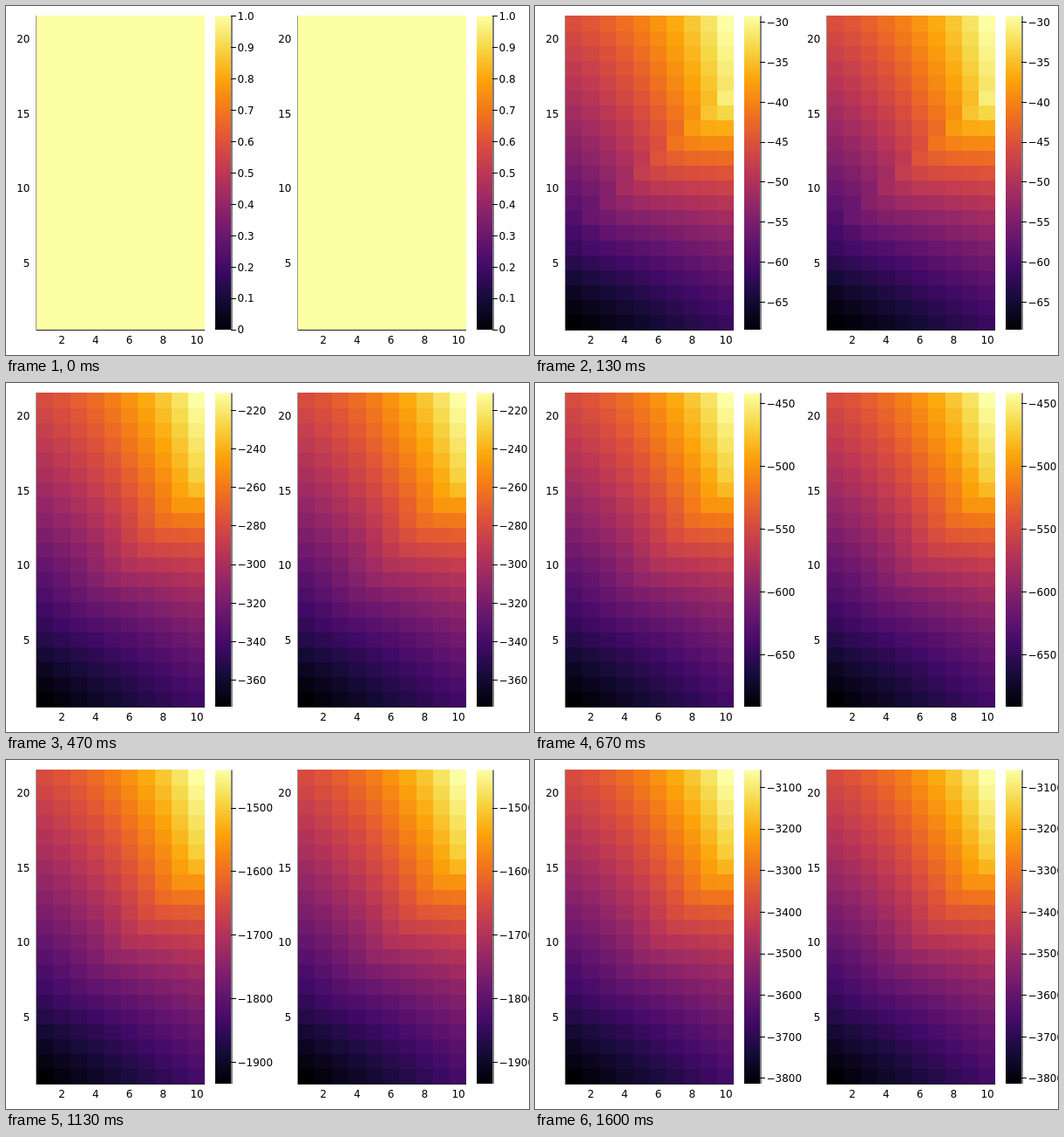
Write an HTML page with a canvas that moves like this. It is 600 px wide and 400 px high and loops after 1.67 s.

```html
<!DOCTYPE html>
<html lang="en">
<head>
<meta charset="utf-8">
<title>Value sweeps</title>
<style>
html, body { margin: 0; width: 600px; height: 400px; overflow: hidden; background: #fff; }
canvas { display: block; }
</style>
</head>
<body>
<canvas id="stage" width="600" height="400"></canvas>
<script>
const ctx = document.getElementById('stage').getContext('2d');
const LOOP = 1670, LAST = 24, COLS = 10, ROWS = 21;
const LEFT = 35.1, RIGHT = 228, TOP = 11.5, BOTTOM = 371.5;
const CELL_W = 19.36, CELL_H = (BOTTOM - TOP) / ROWS;
const BAR = 240, AXIS = 258, BAR_H = 359.5, BAR_BASE = 371;

const inferno = ['000004', '160b39', '420a68', '6a176e', '932667', 'bc3754',
  'dd513a', 'f37819', 'fca50a', 'f6d746', 'fcffa4']
  .map(h => [0, 2, 4].map(i => parseInt(h.slice(i, i + 2), 16)));

// Key points [sweep, value]: highest value and spread of the grid
const peak = [[1, -10.3], [3, -52.07], [10, -441.6], [14, -944.6], [20, -2063.8], [22, -2567], [24, -3058.3]];
const spread = [[1, 16.8], [3, 62], [10, 250], [14, 385.4], [20, 605.2], [24, 754.3]];

const mix = (a, b, w) => a + (b - a) * w;

function color(t) {
  const x = Math.max(0, Math.min(1, t)) * 10, i = Math.min(9, Math.floor(x));
  return `rgb(${inferno[i].map((v, j) => Math.round(mix(v, inferno[i + 1][j], x - i)))})`;
}

// Cubic Hermite curve with parabolic slopes
function curve(pts, x) {
  const n = pts.length - 1;
  const secant = i => (pts[i + 1][1] - pts[i][1]) / (pts[i + 1][0] - pts[i][0]);
  const slope = i => {
    if (i === 0) return secant(0);
    if (i === n) return secant(n - 1);
    const a = pts[i][0] - pts[i - 1][0], b = pts[i + 1][0] - pts[i][0];
    return (secant(i - 1) * b + secant(i) * a) / (a + b);
  };
  let i = 0;
  while (i < n - 1 && x > pts[i + 1][0]) i++;
  const [x0, y0] = pts[i], [x1, y1] = pts[i + 1], h = x1 - x0, u = (x - x0) / h;
  return y0 + (y1 - y0) * u * u * (3 - 2 * u)
    + h * u * (1 - u) * (slope(i) * (1 - u) - slope(i + 1) * u);
}

// Two surfaces meet along a diagonal ridge, which is sharp in early sweeps
function level(c, r, early) {
  const x = c - 1, y = r - 1;
  const upper = .034 * y - .00025 * y * y - .0025 * (r - 12) * early
    + (.022 * x + .0028 * x * x) * (1 - .04 * (r - 18) * early);
  const lower = mix(.21, .14, early) + mix(.268, .335, early) * (Math.exp(.0855 * y) - 1)
    - (COLS - c) * (.0235 - .0065 * early - .0001 * r * r);
  const low = Math.min(upper, lower);
  return c >= r - 6 && r > 7 ? mix(low, lower, early) : low;
}

function grid(k) {
  const cells = [];
  for (let r = 1; r <= ROWS; r++)
    for (let c = 1; c <= COLS; c++) cells.push({ c, r, t: k ? level(c, r, 1 / k) : 1 });
  const max = Math.max(...cells.map(d => d.t));
  cells.forEach(d => d.t /= max);
  return cells;
}

function scale(k) {
  if (!k) return { lo: 0, hi: 1, step: .1 };
  const hi = curve(peak, k), lo = hi - curve(spread, k);
  const count = s => Math.floor(hi / s) - Math.ceil(lo / s) + 1;
  return { lo, hi, step: [2.5, 5, 10, 20, 50, 100].find(s => count(s) <= 8) || 100 };
}

function label(v, step) {
  const digits = v === 0 ? '0' : Math.abs(v).toFixed(step < 5 ? 1 : 0);
  return (v < 0 ? '\u2212' : '') + digits;
}

function text(s, x, y, align) {
  ctx.textAlign = align;
  ctx.fillText(s, x, y);
}

const edgeX = c => Math.min(RIGHT, Math.round(LEFT + c * CELL_W));
const edgeY = r => Math.ceil(BOTTOM - r * CELL_H - .5);

function plot(x0, cells, { lo, hi, step }) {
  ctx.save();
  ctx.translate(x0, 0);

  ctx.fillStyle = '#999';
  ctx.fillRect(34, 11, 1, 361);
  for (const { c, r, t } of cells) {
    const x = edgeX(c - 1), y = edgeY(r);
    ctx.fillStyle = color(t);
    ctx.fillRect(x, y, edgeX(c) - x, edgeY(r - 1) - y);
  }

  const ramp = ctx.createLinearGradient(0, BAR_BASE, 0, TOP);
  inferno.forEach((rgb, i) => ramp.addColorStop(i / 10, `rgb(${rgb})`));
  ctx.fillStyle = ramp;
  ctx.fillRect(BAR, TOP, AXIS - BAR, BAR_H);

  ctx.fillStyle = '#222';
  ctx.fillRect(35, 371, 193, 1);
  ctx.fillStyle = '#000';
  ctx.fillRect(AXIS + .5, TOP, 1, BAR_H);
  for (let c = 2; c <= COLS; c += 2) text(c, LEFT + (c - .5) * CELL_W, 387.3, 'center');
  for (let r = 5; r < ROWS; r += 5) text(r, 27.5, BOTTOM - (r - .5) * CELL_H + 4.7, 'right');

  for (let i = Math.ceil(lo / step); i <= hi / step + 1e-6; i++) {
    const y = BAR_BASE - (i * step - lo) / (hi - lo) * BAR_H;
    ctx.fillRect(AXIS, Math.round(y - .5), 6, 1);
    text(label(i * step, step), 265.5, y + 4.4, 'left');
  }
  ctx.restore();
}

function draw(k) {
  ctx.fillStyle = '#fff';
  ctx.fillRect(0, 0, 600, 400);
  ctx.font = '12px "DejaVu Sans", sans-serif';
  const cells = grid(k), axis = scale(k);
  plot(0, cells, axis);
  plot(300, cells, axis);
}

// 15 sweeps per second, on a 10 ms clock
function sweepAt(t) {
  let k = 0;
  while (k < LAST && Math.round((k + 1) * 20 / 3) * 10 <= t) k++;
  return k;
}

let shown = -1;
const begin = performance.now();
function tick() {
  const k = sweepAt((performance.now() - begin) % LOOP);
  if (k !== shown) draw(shown = k);
  requestAnimationFrame(tick);
}
tick();
</script>
</body>
</html>
```
